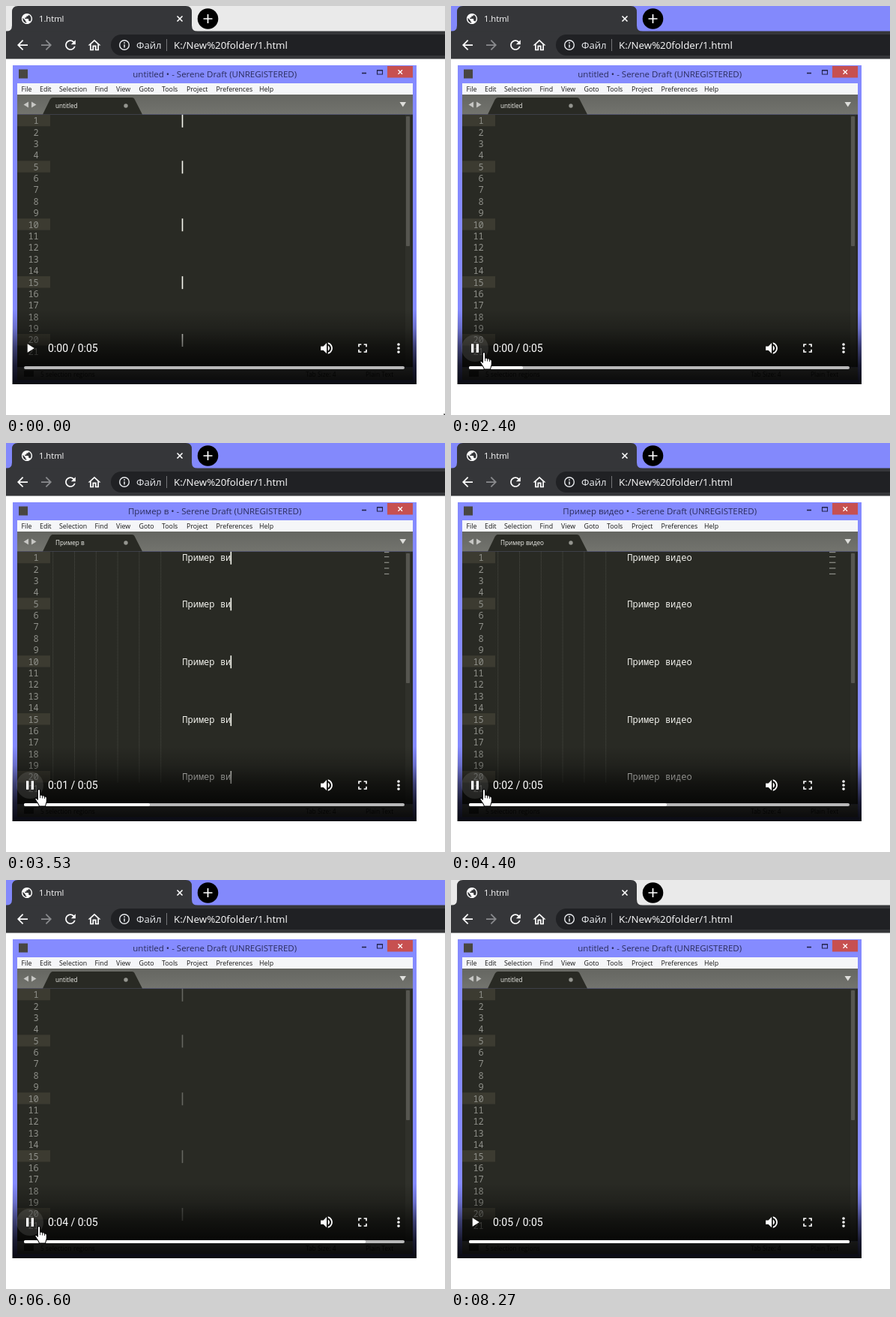
Recreate the animation shown at these times as an HTML page. Size 586 by 545 pixels, loop 8340 ms.

```html
<!DOCTYPE html>
<html lang="ru">
<head>
<meta charset="utf-8">
<title>1.html</title>
<style>
  html, body { margin: 0; width: 100%; height: 100%; overflow: hidden; background: #fff; }
  svg { display: block; width: 586px; height: 545px; }
  text { white-space: pre; font-family: "Open Sans", "Noto Sans", sans-serif; }
  .mono { font-family: "Noto Sans Mono", "DejaVu Sans Mono", monospace; font-size: 12px; }
  .time { font-family: Roboto, Inter, sans-serif; font-size: 14px; }
</style>
</head>
<body>
<svg id="stage" viewBox="0 0 586 545" xmlns="http://www.w3.org/2000/svg">
  <defs>
    <linearGradient id="shade" x1="0" y1="0" x2="0" y2="1">
      <stop offset="0" stop-opacity="0"/>
      <stop offset=".25" stop-opacity=".2"/>
      <stop offset=".5" stop-opacity=".55"/>
      <stop offset=".75" stop-opacity=".8"/>
      <stop offset="1" stop-opacity=".93"/>
    </linearGradient>
    <linearGradient id="tabs" x1="0" y1="0" x2="0" y2="1">
      <stop offset="0" stop-color="#656661"/>
      <stop offset="1" stop-color="#73746e"/>
    </linearGradient>
  </defs>
  <rect width="586" height="545" fill="#fff"/>
  <g id="browser"></g>
  <g id="editor"></g>
  <g id="controls"></g>
  <g id="pointer"></g>
</svg>
<script>
const LOOP = 8340, PLAY = 1645, DURATION = 5290, END = PLAY + DURATION;
const TYPE = 2700, KEY = 100, UNDO = 6130, TITLE_LAG = 60;
const PHRASE = 'Пример видео', CHAR = 7.2, TEXT_X = 235.3;
const ROWS = [1, 5, 10, 15, 20];

const byId = id => document.getElementById(id);
const clamp = (v, lo, hi) => Math.max(lo, Math.min(hi, v));
const lineY = n => 152.8 + (n - 1) * 15.38;

function add(parent, tag, attrs, content) {
  const el = document.createElementNS('http://www.w3.org/2000/svg', tag);
  for (const key in attrs) el.setAttribute(key, attrs[key]);
  if (content !== undefined) el.textContent = content;
  parent.appendChild(el);
  return el;
}
const rect = (p, x, y, width, height, fill, more) => add(p, 'rect', { x, y, width, height, fill, ...more });
const path = (p, d, fill, more) => add(p, 'path', { d, fill, ...more });
const stroke = (p, d, color, width, more) => path(p, d, 'none', { stroke: color, 'stroke-width': width, ...more });
const label = (p, x, y, size, fill, content, more) => add(p, 'text', { x, y, 'font-size': size, fill, ...more }, content);
const icon = (p, d, cx, cy, size, fill = '#fff') =>
  path(p, d, fill, { transform: `translate(${cx} ${cy}) scale(${size / 24}) translate(-12 -12)` });

// Browser window
const browser = byId('browser');
const strip = rect(browser, 0, 0, 586, 34, '#8389fc');
path(browser, 'M0 34q8 0 8-8V8q0-8 8-8H240q8 0 8 8v18q0 8 8 8z', '#353639');
rect(browser, 0, 33.5, 586, 37, '#353639');
icon(browser, 'M12 2C6.48 2 2 6.48 2 12s4.48 10 10 10 10-4.48 10-10S17.52 2 12 2zm-1 17.93c-3.95-.49-7-3.85-7-7.93 0-.62.08-1.21.21-1.79L9 15v1c0 1.1.9 2 2 2v1.93zm6.9-2.54c-.26-.81-1-1.39-1.9-1.39h-1v-3c0-.55-.45-1-1-1H8v-2h2c.55 0 1-.45 1-1V7h2c1.1 0 2-.9 2-2v-.41c2.93 1.19 5 4.06 5 7.41 0 2.08-.8 3.97-2.1 5.39z', 28, 17, 17);
label(browser, 44, 21, 11.2, '#fff', '1.html');
stroke(browser, 'M228.5 13.5l7 7m0-7l-7 7', '#fff', 1.6);
add(browser, 'circle', { cx: 269.5, cy: 17, r: 13.8, fill: '#000' });
stroke(browser, 'M263.5 17h12m-6-6v12', '#fff', 1.7);
const ARROW = 'M20 11H7.83l5.59-5.59L12 4l-8 8 8 8 1.41-1.41L7.83 13H20v-2z';
icon(browser, ARROW, 22, 52, 21);
add(browser, 'g', { transform: 'matrix(-1 0 0 1 108 0)' }).appendChild(icon(browser, ARROW, 54, 52, 21, '#8a8b8e'));
icon(browser, 'M17.65 6.35A7.958 7.958 0 0 0 12 4c-4.42 0-7.99 3.58-7.99 8s3.57 8 7.99 8c3.73 0 6.84-2.55 7.73-6h-2.08A5.99 5.99 0 0 1 12 18c-3.31 0-6-2.69-6-6s2.69-6 6-6c1.66 0 3.14.69 4.22 1.78L13 11h7V4l-2.35 2.35z', 86, 52, 20.5);
icon(browser, 'M12 5.69l5 4.5V18h-2v-6H9v6H7v-7.81l5-4.5M12 3L2 12h3v8h6v-6h2v6h6v-8h3L12 3z', 118, 52.5, 20.5);
path(browser, 'M586 38H154a14 14 0 0 0 0 28h432z', '#202124');
add(browser, 'circle', { cx: 158, cy: 52, r: 6.3, fill: 'none', stroke: '#e8eaed', 'stroke-width': 1.4 });
stroke(browser, 'M158 48.3v1.6m0 1.3v4.4', '#e8eaed', 1.5);
label(browser, 174, 56.5, 13.1, '#e8eaed', 'Файл');
rect(browser, 214, 44, 1, 16, '#75777a');
label(browser, 224, 56.5, 13.3, '#fff', 'K:/New%20folder/1.html');

// Editor window shown in the video
const editor = byId('editor');
rect(editor, 9, 79, 539, 425, '#858bff');
rect(editor, 17, 84.5, 12, 12, '#484641');
const title = label(editor, 278.7, 95, 11.5, '#2b2d5c', '', { 'text-anchor': 'middle' });
stroke(editor, 'M475 89.5h6', '#22244a', 1.6);
stroke(editor, 'M495.5 85.5h7v5.5h-7zM495 86h8', '#22244a', 1.1);
rect(editor, 509, 80, 34, 15.5, '#c75050');
stroke(editor, 'M523.5 85.2l5.5 5.5m0-5.5l-5.5 5.5', '#fff', 1.3);
rect(editor, 15, 103, 528, 15, '#f5f6f8');
const MENU = { File: 20.5, Edit: 45, Selection: 71, Find: 118.5, View: 147, Goto: 177.5, Tools: 208, Project: 241, Preferences: 280.5, Help: 338 };
for (const name in MENU) label(editor, MENU[name], 113.8, 8.8, '#151515', name);
rect(editor, 15, 118, 528, 26.5, 'url(#tabs)');
path(editor, 'M49 144.5L58.5 125q1.5-3 4-3H168q3 0 4 3l10 19.5z', '#292a24');
path(editor, 'M30 127.5v8l-6.5-4zM34 127.5v8l6.5-4z', '#c6c6c3');
path(editor, 'M525.5 128h8.5l-4.2 6.5z', '#dededb');
const tabName = label(editor, 66, 136, 8.2, '#f0f0ec', '');
add(editor, 'circle', { cx: 160, cy: 133, r: 2.7, fill: '#94958f' });
rect(editor, 15, 144.5, 528, 337, '#292a24');
for (const n of ROWS) rect(editor, 15, lineY(n) - 8, 44, 15.4, '#3c3b31');
for (let n = 1; n <= 21; n++)
  label(editor, 43.8, lineY(n) + 4.4, 12, '#8f908a', n, { class: 'mono', 'text-anchor': 'end' });
rect(editor, 533, 145, 7.5, 336, '#30312b');
rect(editor, 534, 147, 5, 173, '#565650', { rx: 1 });

const marks = add(editor, 'g', {});
for (let i = 1; i <= 6; i++)
  stroke(marks, `M${TEXT_X + 0.2 - i * 4 * CHAR} 145V453`, '#4b4c45', 1, { 'stroke-dasharray': '1 1' });
const mini = ROWS.map(n => rect(marks, 505, 145 + (n - 1) * 1.52, 0, 1.2, '#8f908a'));
const lines = ROWS.map(n => label(editor, TEXT_X, lineY(n) + 4.4, 12, '#f3f3ee', '', { class: 'mono' }));
const carets = ROWS.map(n => rect(editor, 0, lineY(n) - 8, 1.6, 17, '#f8f8f0'));

rect(editor, 15, 481.5, 528, 17, '#7b7c78');
rect(editor, 24, 486, 13, 8, '#33342f');
label(editor, 46, 493.5, 8.4, '#15150f', '5 selection regions');
label(editor, 400, 493.5, 8.4, '#15150f', 'Tab Size: 4');
label(editor, 480, 493.5, 8.4, '#15150f', 'Plain Text');

// Player controls
const controls = byId('controls');
rect(controls, 8.5, 404, 539.5, 100, 'url(#shade)');
const hover = add(controls, 'circle', { cx: 32, cy: 456, r: 18, fill: '#fff', 'fill-opacity': .1 });
const playIcon = icon(controls, 'M8 5v14l11-7z', 32, 456, 20);
const pauseIcon = icon(controls, 'M6 19h4V5H6v14zm8-14v14h4V5h-4z', 32, 456, 20);
const clock = label(controls, 56, 461, 14, '#fff', '', { class: 'time' });
icon(controls, 'M3 9v6h4l5 5V4L7 9H3zm13.5 3c0-1.77-1.02-3.29-2.5-4.03v8.05c1.48-.73 2.5-2.25 2.5-4.02zM14 3.23v2.06c2.89.86 5 3.54 5 6.71s-2.11 5.85-5 6.71v2.06c4.01-.91 7-4.49 7-8.77s-2.99-7.86-7-8.77z', 428, 456, 21);
icon(controls, 'M7 14H5v5h5v-2H7v-3zm-2-4h2V7h3V5H5v5zm12 7h-3v2h5v-5h-2v3zM14 5v2h3v3h2V5h-5z', 476, 456, 20);
for (const dy of [-5, 0, 5]) add(controls, 'circle', { cx: 524, cy: 456 + dy, r: 1.8, fill: '#fff' });
rect(controls, 24, 480, 508, 4, '#b8b8b9', { rx: 2 });
const played = rect(controls, 24, 480, 0, 4, '#fff', { rx: 2 });

// Pointer
const pointer = byId('pointer');
const outline = { stroke: '#000', 'stroke-width': 1, 'stroke-linejoin': 'round' };
const hand = add(pointer, 'g', { transform: 'translate(-5 0) scale(1.05)' });
path(hand, 'M5 .5C6.2.5 6.8 1.4 6.8 2.3V8c.7-.7 2.5-.4 2.8.7.9-.7 2.6-.2 2.8 1 1.2-.5 2.6.3 2.6 1.8v4c0 2.5-1.5 4-1.5 6.5h-8c0-2-1.5-3.5-2.9-5.5L.6 13.3c-.5-1 .6-2.1 1.7-1.3l1.4 1.4V2.3C3.7 1.4 4 .5 5 .5z', '#fff', outline);
stroke(hand, 'M6.8 8v3.6M9.6 8.7v3.2M12.4 9.7v2.6', '#000', .8);
const arrow = path(pointer, 'M.5.5v16l3.7-3.6 2.4 5.6 2.3-1-2.4-5.4h5.2z', '#fff', outline);

const MOVES = [[540, 584.5, 543], [870, 69, 492], [1280, 43.5, 461], [7050, 43.5, 461], [7530, 105, 565]];
function pointerAt(t) {
  if (t <= MOVES[0][0]) return MOVES[0].slice(1);
  for (let i = 1; i < MOVES.length; i++) {
    const [t0, x0, y0] = MOVES[i - 1], [t1, x1, y1] = MOVES[i];
    if (t > t1) continue;
    const k = Math.sin((t - t0) / (t1 - t0) * Math.PI / 2);
    return [x0 + (x1 - x0) * k, y0 + (y1 - y0) * k];
  }
  return MOVES[MOVES.length - 1].slice(1);
}

const typedAt = t => t < TYPE || t >= UNDO ? 0 : Math.min(PHRASE.length, Math.floor((t - TYPE) / KEY) + 1);

function caretOpacity(t) {
  const lastKey = TYPE + KEY * (PHRASE.length - 1);
  const start = t < TYPE ? 1680 : t < UNDO ? lastKey : UNDO;
  const phase = Math.max(0, t - start) % 1000;
  if (phase < 500) return clamp((500 - phase) / 100, 0, 1);
  return clamp((phase - 900) / 100, 0, 1);
}

function draw(t) {
  strip.setAttribute('fill', t < 200 || t >= 8270 ? '#eaeaea' : '#8389fc');

  const frozen = clamp(t, PLAY, END);
  const count = typedAt(frozen);
  const name = PHRASE.slice(0, typedAt(frozen - TITLE_LAG)).trimEnd() || 'untitled';
  title.textContent = name + ' • - Serene Draft (UNREGISTERED)';
  tabName.textContent = name;
  marks.style.display = count ? '' : 'none';
  const opacity = caretOpacity(frozen);
  ROWS.forEach((_, i) => {
    lines[i].textContent = PHRASE.slice(0, count);
    mini[i].setAttribute('width', count * .7);
    carets[i].setAttribute('x', TEXT_X - .6 + count * CHAR);
    carets[i].setAttribute('opacity', opacity);
  });

  // The timeline advances in quarter-second steps
  const media = t >= END ? DURATION : Math.floor(clamp(t - PLAY, 0, DURATION) / 250) * 250;
  played.setAttribute('width', media / DURATION * 508);
  clock.textContent = `0:0${Math.floor(media / 1000)} / 0:05`;
  const playing = t >= PLAY && t < END;
  playIcon.style.display = playing ? 'none' : '';
  pauseIcon.style.display = playing ? '' : 'none';

  const [x, y] = pointerAt(t);
  pointer.setAttribute('transform', `translate(${x} ${y})`);
  hand.style.display = y < 504 ? '' : 'none';
  arrow.style.display = y < 504 ? 'none' : '';
  hover.style.display = Math.hypot(x - 32, y - 456) < 24 ? '' : 'none';
}

const began = performance.now();
function tick() {
  draw((performance.now() - began) % LOOP);
  requestAnimationFrame(tick);
}
tick();
</script>
</body>
</html>
```
